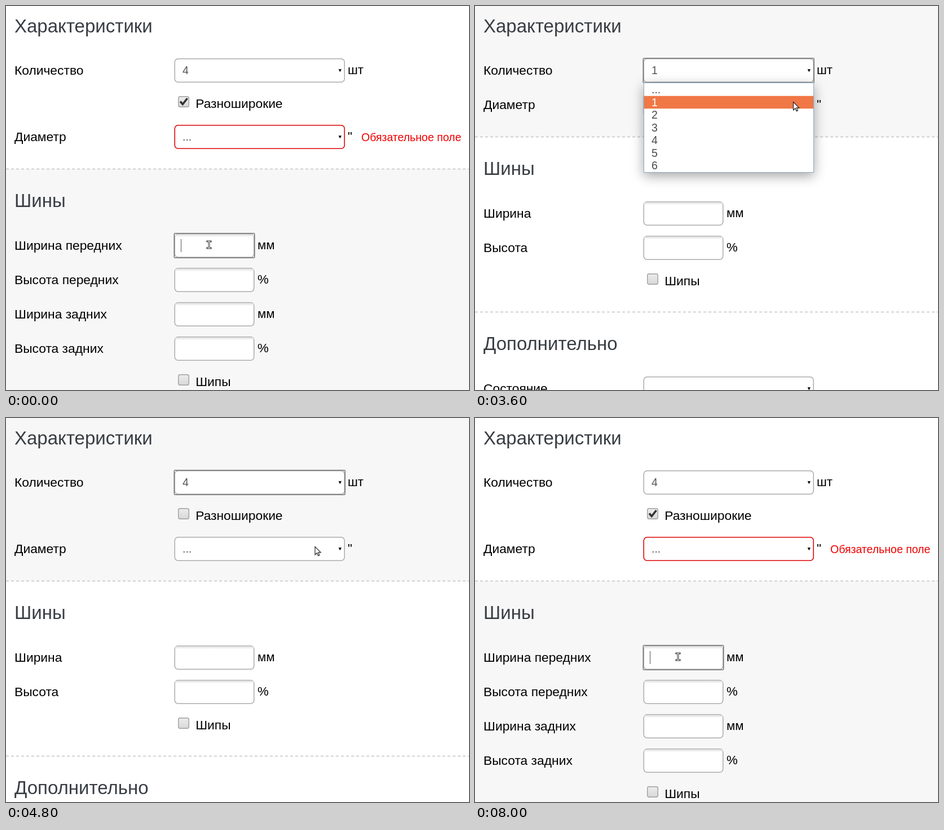
An HTML page for the animation above (8.1 s loop, 821 px wide and 682 px high).

```html
<!DOCTYPE html>
<html lang="ru">
<head>
<meta charset="utf-8">
<title>Характеристики</title>
<style>
html, body { margin: 0; width: 100%; height: 100%; overflow: hidden; background: #fff; }
body { position: relative; font-family: "Liberation Sans", Arial, sans-serif; }
svg { position: absolute; left: 0; top: 0; width: 821px; height: 682px; }
text { font-size: 22.8px; fill: #000; white-space: pre; }
.head { font-size: 33px; fill: #383d42; }
.unit { font-size: 22.2px; }
.val { font-size: 19.5px; fill: #555; }
.err { font-size: 19.5px; fill: #f00000; }
.box { fill: #fff; stroke: #ababab; stroke-width: 1.5; }
.focus { fill: none; stroke: #777; stroke-width: 1.5; }
.bad { fill: none; stroke: #ea1212; stroke-width: 1.6; }
.shade { fill: url(#inset); }
.check { fill: url(#grey); stroke: #a0a0a0; stroke-width: 1.4; }
.tick { fill: none; stroke: #333; stroke-width: 3.6; }
.line { stroke: #c4c4c4; stroke-width: 1.5; stroke-dasharray: 5 4; }
.pane { fill: #f7f7f7; }
#popup {
  position: absolute; left: 299px; top: 136px; width: 300px; height: 158px;
  border: 1px solid #8ea9c4; background: #fff;
  box-shadow: 0 6px 20px rgba(0, 0, 0, .36);
}
.list { position: absolute; left: 0; top: .3px; width: 300px; color: #4c4c4c; font-size: 19.5px; }
.list div { height: 22.5px; line-height: 22.5px; padding-left: 13px; }
#hot { background: #f07746; color: #fff; }
</style>
</head>
<body>
<svg id="form" viewBox="0 0 821 682"></svg>
<div id="popup"><div class="list" id="plain"></div><div class="list" id="hot"></div></div>
<svg viewBox="0 0 821 682">
  <g id="cursor">
    <path id="arrow" d="M.5 .5V14.8L3.9 11.7L6.1 16.6L8.4 15.6L6.2 10.8H10.6Z" fill="#fff" stroke="#222" stroke-width="1.2"/>
    <g id="beam" fill="none">
      <path d="M-3 -6H3M0 -6V6M-3 6H3" stroke="#333" stroke-width="3" stroke-linecap="square"/>
      <path d="M-3 -6H3M0 -6V6M-3 6H3" stroke="#fff" stroke-width="1.1"/>
    </g>
  </g>
</svg>
<script>
const LOOP = 8100;
const $ = id => document.getElementById(id);

// Markup helpers
const text = (x, y, s, cls = '') => `<text x="${x}" y="${y}" class="${cls}">${s}</text>`;
const rect = (x, y, w, h, r, cls, id = '') =>
  `<rect x="${x}" y="${y}" width="${w}" height="${h}" rx="${r}" class="${cls}" id="${id}"/>`;
const group = (id, ...parts) => `<g id="${id}">${parts.join('')}</g>`;
const line = y => `<line x2="821" y1="${y}" y2="${y}" class="line"/>`;
const label = (y, s, more = '', id = '') =>
  text(15, y + 28.25, s + (more && `<tspan id="${id}">${more}</tspan>`));
const focus = (y, w, id) => rect(298.25, y - 1, w + 2, 43.5, 1.5, 'focus', id);

const select = (y, unit) =>
  rect(299.25, y, 301, 41.5, 6, 'box') +
  `<path d="M589.6 ${y + 18.6}h5.4l-2.7 5z"/>` +
  text(606, y + 27.25, unit, 'unit');

const input = (y, unit) =>
  rect(299.25, y, 140.5, 41.5, 6, 'box') +
  rect(300, y + .75, 139, 5, 4, 'shade') +
  text(446, y + 27.25, unit, 'unit');

const checkbox = (y, s) =>
  rect(305.7, y - 9.3, 18.6, 18.6, 3, 'check') + text(336.2, y + 11, s);

$('form').innerHTML = `
  <defs>
    <linearGradient id="inset" x2="0" y2="1"><stop stop-color="#ddd"/><stop offset="1" stop-color="#fff"/></linearGradient>
    <linearGradient id="grey" x2="0" y2="1"><stop stop-color="#ececec"/><stop offset="1" stop-color="#d8d8d8"/></linearGradient>
  </defs>` +
  group('panes',
    rect(0, -100, 821, 332.5, 0, 'pane', 'topPane'),
    rect(0, 232.5, 821, 500, 0, 'pane', 'lowPane')) +
  text(15, 46.5, 'Характеристики', 'head') +
  label(93.75, 'Количество') +
  select(93.75, 'шт') +
  text(313, 121, '1', 'val one') + text(313, 121, '4', 'val four') +
  focus(93.75, 301, 'qtyFocus') +
  group('mixed',
    checkbox(170, 'Разноширокие'),
    '<path id="tick" class="tick" d="M309 169.5l4.3 5 8.2-10.5"/>') +
  group('lower',
    label(154.75, 'Диаметр'),
    select(154.75, '&quot;'),
    text(313, 182, '...', 'val'),
    group('error',
      rect(299.25, 154.75, 301, 41.5, 6, 'bad'),
      text(630, 183, 'Обязательное поле', 'err')),
    line(232.5),
    text(15, 300, 'Шины', 'head'),
    label(347.75, 'Ширина', ' передних', 'front1'),
    input(347.75, 'мм'),
    label(408.75, 'Высота', ' передних', 'front2'),
    input(408.75, '%'),
    group('rear',
      label(469.75, 'Ширина задних'), input(469.75, 'мм'),
      label(530.75, 'Высота задних'), input(530.75, '%')),
    group('typing',
      focus(347.75, 140.5, 'widthFocus'),
      '<path d="M310.5 357v23" stroke="#555"/>'),
    group('tail',
      checkbox(485, 'Шипы'),
      line(543.5),
      text(15, 611, 'Дополнительно', 'head'),
      label(658.75, 'Состояние'),
      select(658.75, '')));

const items = ['...', 1, 2, 3, 4, 5, 6];
$('plain').innerHTML = $('hot').innerHTML = items.map(s => `<div>${s}</div>`).join('');

// Timeline: each value holds until the next key
let css = '', count = 0;
function hold(selector, prop, keys) {
  const name = 'k' + count++;
  const steps = keys.map(([ms, v]) => `${Math.max(0, ms - 1) / LOOP * 100}%{${prop}:${v}}`);
  css += `@keyframes ${name}{${steps.join('')}}${selector}{animation:${name} ${LOOP}ms step-end infinite}`;
}
const vis = on => on ? 'visible' : 'hidden';
const toggle = (selector, first, ...times) =>
  hold(selector, 'visibility', [[0, vis(first)], ...times.map((ms, i) => [ms, vis(first ^ (i + 1) % 2)])]);

const START = 1300, OPEN = 3100, PICK = 4700, BLUR = 6200, CHECK = 6300, CLICK = 8000;

hold('#lower,#panes', 'transform', [[0, 'translateY(57px)'], [START, 'none'], [PICK, 'translateY(57px)']]);
hold('#tail', 'transform', [[0, 'translateY(122px)'], [START, 'none'], [CHECK, 'translateY(122px)']]);
toggle('.one', false, START, PICK);
toggle('.four,#mixed', true, START, PICK);
toggle('#tick,#front1,#front2,#rear', true, START, CHECK);
toggle('#qtyFocus', false, START, BLUR);
toggle('#error,#typing,#lowPane', true, START, CLICK);
toggle('#topPane', false, START, CLICK);
toggle('#popup', false, OPEN, PICK);
toggle('#beam', true, START, 7300);
toggle('#arrow', false, 2200, 7300);

const row = i => `inset(${i * 22.5}px 0 ${(6 - i) * 22.5}px 0)`;
hold('#hot', 'clip-path',
  [[0, 1], [3500, 0], [3600, 1], [3700, 2], [3800, 3], [4000, 4]].map(([ms, i]) => [ms, row(i)]));

// Pointer runs: one point every 100 ms
const run = (ms, ...pts) => pts.map(([x, y], i) => [ms + i * 100, `translate(${x}px,${y}px)`]);
hold('#cursor', 'transform', [
  ...run(0, [360, 424]),
  ...run(2200, [622, 600], [612, 470], [596, 320], [580, 200], [571, 138], [568, 121]),
  ...run(2900, [567, 121.5]),
  ...run(3500, [566, 150], [564, 170], [560, 191], [555, 210], [550, 223], [548, 229]),
  ...run(4200, [547.5, 228]),
  ...run(5400, [525, 215], [480, 193], [441, 176], [428, 170]),
  ...run(6000, [426, 169]),
  ...run(6900, [418, 195], [402, 255], [384, 330], [370, 388], [362, 418], [360, 424])
]);

document.head.appendChild(document.createElement('style')).textContent = css;
</script>
</body>
</html>
```
